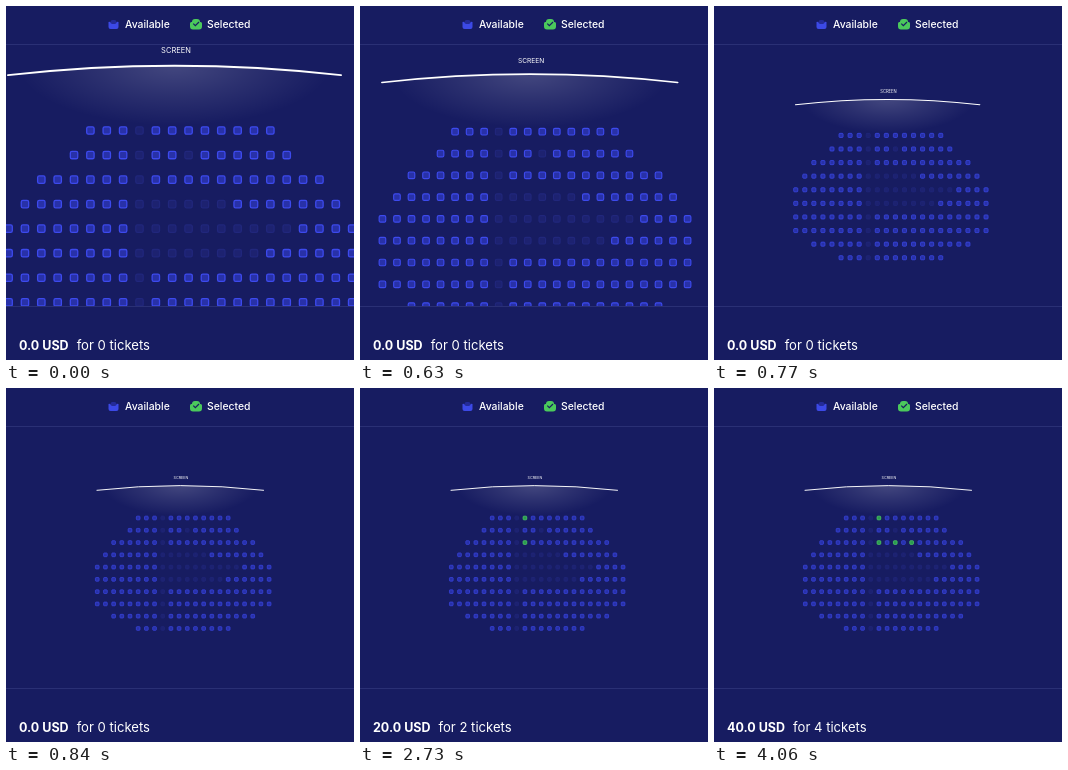
Recreate the animation shown at these times as an HTML page. Size 348x354 px, loop 4410 ms.

```html
<!DOCTYPE html>
<html lang="en">
<head>
<meta charset="utf-8">
<style>
  html, body { margin: 0; width: 100%; height: 100%; overflow: hidden; background: #171c61; }
  svg { display: block; width: 348px; height: 354px; font-family: Inter, "Open Sans", sans-serif; fill: #fff; }
  .seat { fill: #2831a8; stroke: #3d4aed; stroke-width: .65; }
  .seat.taken { fill: #1d2270; stroke: #21277c; }
  .seat.picked { fill: #2a9a50; stroke: #55dd68; }
  .rule { stroke: #2a3075; }
  .legend { font-size: 10.4px; font-weight: 500; }
</style>
</head>
<body>
<svg viewBox="0 0 348 354">
  <defs>
    <clipPath id="hall"><rect y="38" width="348" height="262"/></clipPath>
    <radialGradient id="glow" gradientUnits="userSpaceOnUse" cx="0" cy="0" r="1"
      gradientTransform="translate(-5.7 -38) scale(78 30)">
      <stop offset="0" stop-color="#fff" stop-opacity=".19"/>
      <stop offset=".5" stop-color="#fff" stop-opacity=".09"/>
      <stop offset="1" stop-color="#fff" stop-opacity="0"/>
    </radialGradient>
  </defs>

  <g clip-path="url(#hall)">
    <g id="plan">
      <path d="M-89 -33.2Q-5.7 -42.6 77.5 -33.2L60 -6H-72Z" fill="url(#glow)"/>
      <path d="M-89 -33.2Q-5.7 -42.6 77.5 -33.2" fill="none" stroke="#fff" stroke-width=".95" stroke-linecap="round"/>
      <text x="-5" y="-44.1" font-size="3.75" text-anchor="middle">SCREEN</text>
      <g id="seats"></g>
    </g>
  </g>

  <path class="rule" d="M0 38.5H348M0 300.5H348"/>

  <g class="legend">
    <path d="M104.5 19V16q0-2 2-2h2q2 0 2 2v3z" fill="#242b98"/>
    <path d="M102.5 16q2-1 2.5 1.5 2.5 1 5 0 .5-2.5 2.5-1.5v5q0 2-2 2h-6q-2 0-2-2z" fill="#3c49e6"/>
    <text x="119" y="22.3">Available</text>
    <path d="M186 16q0-3 3-3h2q3 0 3 3 2-.5 2 1.500v3q0 3-3 3h-6q-3 0-3-3v-3q0-2 2-1.500z" fill="#4bc95c"/>
    <path d="M187.300 17.700l2 2 3.700-3.700" fill="none" stroke="#171c61" stroke-width="1.200"/>
    <text x="201" y="22.3">Selected</text>
  </g>

  <text id="price" x="13" y="343.6" font-size="12.5" font-weight="700"></text>
  <text id="count" y="343.6" font-size="13.1"></text>
</svg>
<script>
const LOOP = 4410, STEP = 70;
const ZOOM_START = 522, ZOOM_TIME = 323;
const $ = id => document.getElementById(id);

// Each row: first column, last column, taken columns from..to, extra taken column
const rows = [
  [0, 11, 3, 3], [-1, 12, 3, 3, 6], [-3, 14, 3, 3], [-4, 15, 3, 8], [-5, 16, 3, 12],
  [-5, 16, 3, 10], [-5, 16, 3, 3], [-5, 16, 3, 3], [-3, 14, 3, 3], [0, 11, 3, 3]
];
const picks = [
  { at: 1890, row: 0, col: 4 }, { at: 2730, row: 2, col: 4 },
  { at: 3430, row: 2, col: 6 }, { at: 4060, row: 2, col: 8 }
];

function addSeat(row, col, taken) {
  const seat = document.createElementNS("http://www.w3.org/2000/svg", "rect");
  const attrs = {
    x: -47.8 + col * 8.18 - 1.85, y: -5.5 + row * 12.27 - 1.85,
    width: 3.7, height: 3.7, rx: .8, class: taken ? "seat taken" : "seat"
  };
  for (const name in attrs) seat.setAttribute(name, attrs[name]);
  $("seats").append(seat);
  const pick = picks.find(p => p.row === row && p.col === col);
  if (pick) pick.seat = seat;
}

rows.forEach(([first, last, from, to, extra], row) => {
  for (let col = first; col <= last; col++)
    addSeat(row, col, (col >= from && col <= to) || col === extra);
});

const easeInOut = u => u < .5 ? 2 * u * u : 1 - 2 * (1 - u) ** 2;

function draw(now) {
  const t = Math.floor(now % LOOP / STEP) * STEP;
  const u = Math.min(1, Math.max(0, (t - ZOOM_START) / ZOOM_TIME));
  $("plan").setAttribute("transform", `translate(180 135.5) scale(${2 - easeInOut(u)})`);

  let tickets = 0;
  for (const { at, seat } of picks) {
    const picked = t >= at;
    seat.classList.toggle("picked", picked);
    tickets += picked;
  }
  $("price").textContent = `${tickets * 10}.0 USD`;
  $("count").textContent = `for ${tickets} tickets`;
  $("count").setAttribute("x", 21 + $("price").getComputedTextLength());
}

const start = performance.now();
function tick() {
  draw(performance.now() - start);
  requestAnimationFrame(tick);
}
tick();
</script>
</body>
</html>
```
